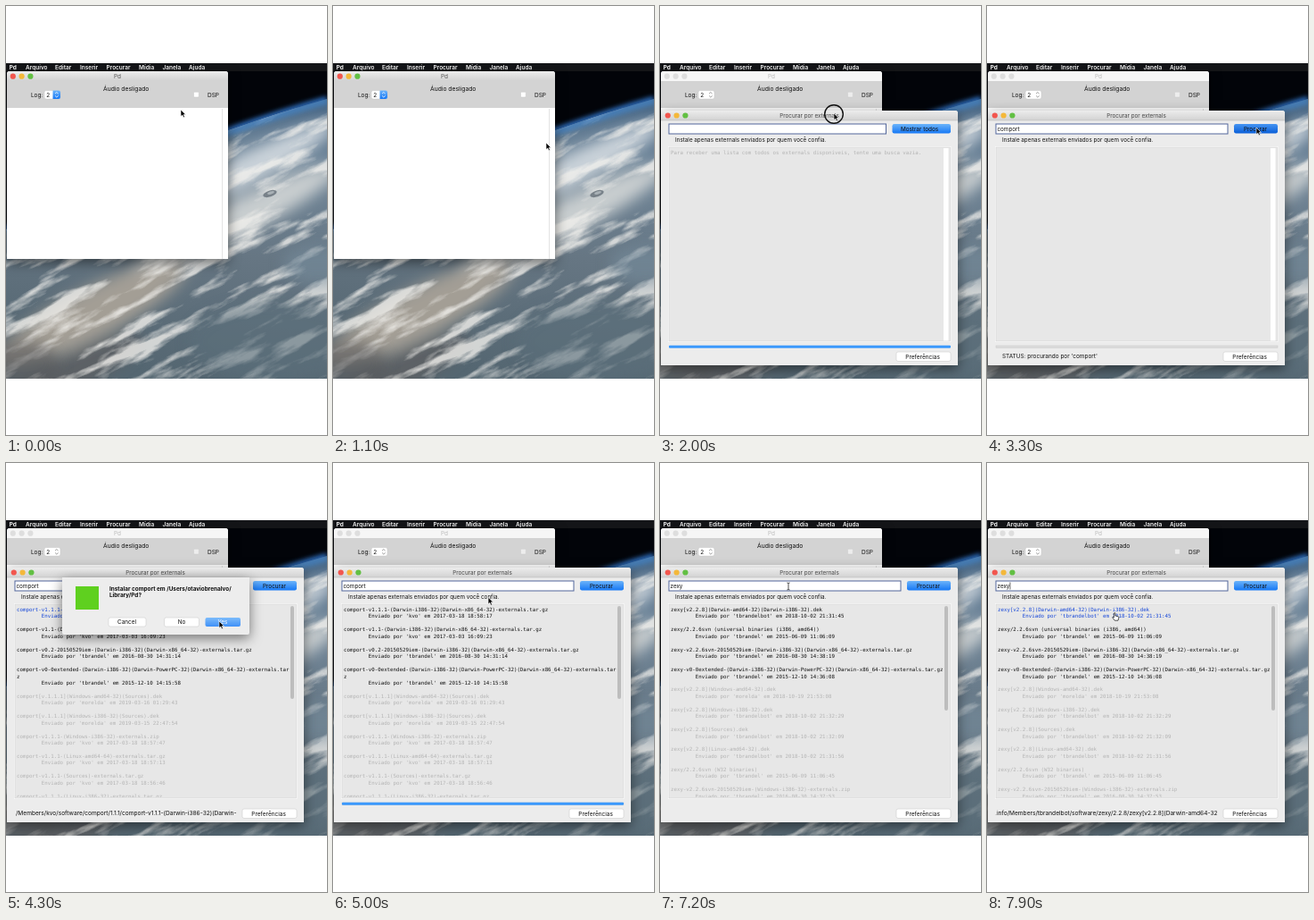
An HTML page for the animation above (8000 ms loop, 360x480 px).

```html
<!DOCTYPE html>
<html lang="pt">
<head>
<meta charset="utf-8">
<title>Procurar por externals</title>
<style>
  html, body { margin: 0; width: 100%; height: 100%; overflow: hidden; background: #fff; }
  svg { position: absolute; left: 0; top: 0; width: 360px; height: 480px; }
  #wall { will-change: transform; }
  text { font: 6.4px Inter, Roboto, sans-serif; fill: #111; }
  .mid { text-anchor: middle; }
  .menu text { font-size: 6.5px; font-weight: 600; fill: #fff; }
  .mono text { font: 5.77px "DejaVu Sans Mono", monospace; }
  .mono .dim { fill: #b4b4b4; }
  .mono .hot { fill: #1546d8; }
  text.strong { font-weight: 700; }
  .shadow { filter: drop-shadow(0 4px 7px rgba(0,0,0,.5)); }
  .plain { fill: #fff; stroke: #c4c4c4; stroke-width: .5; }
</style>
</head>
<body>
<svg id="wall" viewBox="0 0 360 480">
  <defs>
    <clipPath id="desk"><rect y="64" width="360" height="353"/></clipPath>
    <clipPath id="globe"><path d="M0 250Q140 178 250 139Q310 118 360 104V417H0Z"/></clipPath>
    <linearGradient id="sea" x1=".75" y1="0" x2=".6" y2="1">
      <stop offset="0" stop-color="#35587c"/>
      <stop offset=".28" stop-color="#71879a"/>
      <stop offset=".6" stop-color="#667683"/>
      <stop offset="1" stop-color="#546671"/>
    </linearGradient>
    <filter id="soft" x="-50%" y="-50%" width="200%" height="200%"><feGaussianBlur stdDeviation="8"/></filter>
    <filter id="glow" x="-20%" y="-50%" width="140%" height="200%"><feGaussianBlur stdDeviation="2.5"/></filter>
    <filter id="cloud" x="0" y="0" width="100%" height="100%">
      <feTurbulence type="fractalNoise" baseFrequency=".013 .06" numOctaves="6" seed="8"/>
      <feColorMatrix values="0 0 0 0 .89  0 0 0 0 .88  0 0 0 0 .85  4.6 0 0 0 -2.15"/>
    </filter>
  </defs>
  <g clip-path="url(#desk)">
    <rect y="64" width="360" height="353" fill="#020409"/>
    <path d="M0 250Q140 178 250 139Q310 118 360 104" fill="none" stroke="#2a68b4" stroke-width="7" filter="url(#glow)"/>
    <g clip-path="url(#globe)">
      <rect y="64" width="360" height="353" fill="url(#sea)"/>
      <g transform="rotate(-27 180 290)" filter="url(#soft)">
        <ellipse cx="300" cy="235" rx="120" ry="17" fill="#c9d2d9"/>
        <ellipse cx="270" cy="280" rx="130" ry="20" fill="#c8cdcf"/>
        <ellipse cx="80" cy="300" rx="120" ry="28" fill="#a39e95"/>
        <ellipse cx="20" cy="350" rx="100" ry="20" fill="#5c6165"/>
      </g>
      <rect x="-100" y="-10" width="620" height="600" transform="rotate(-27 180 290)" filter="url(#cloud)" opacity=".8"/>
      <g filter="url(#soft)" opacity=".6">
        <ellipse cx="300" cy="375" rx="95" ry="45" fill="#5b6f7b"/>
        <ellipse cx="15" cy="400" rx="45" ry="25" fill="#565658"/>
        <ellipse cx="350" cy="290" rx="40" ry="22" fill="#768c9c"/>
      </g>
      <path d="M0 250Q140 178 250 139Q310 118 360 104" fill="none" stroke="#4580bd" stroke-width="12" opacity=".8" filter="url(#glow)"/>
      <ellipse cx="296" cy="210" rx="8" ry="3.5" fill="#667079" opacity=".8" transform="rotate(-18 296 210)"/>
      <ellipse cx="297" cy="209" rx="4" ry="1.5" fill="#a9b1b6" transform="rotate(-18 297 209)"/>
    </g>
  </g>
</svg>

<svg id="ui" viewBox="0 0 360 480">
  <defs>
    <linearGradient id="bar" x2="0" y2="1"><stop stop-color="#ececec"/><stop offset="1" stop-color="#d2d2d2"/></linearGradient>
    <linearGradient id="blue" x2="0" y2="1"><stop stop-color="#6bb3fa"/><stop offset="1" stop-color="#1678f5"/></linearGradient>
    <linearGradient id="press" x2="0" y2="1"><stop stop-color="#4594f2"/><stop offset="1" stop-color="#0a5fd8"/></linearGradient>
    <linearGradient id="pale" x2="0" y2="1"><stop stop-color="#7dbcfb"/><stop offset="1" stop-color="#3f90f7"/></linearGradient>
    <clipPath id="listClip"><rect x="10" y="159" width="308" height="215"/></clipPath>
    <clipPath id="urlClip"><rect x="9.5" y="385" width="249.5" height="14"/></clipPath>
  </defs>
  <g clip-path="url(#desk)">
    <g class="menu" id="menu"><rect y="64" width="360" height="9" fill="#141518"/></g>

    <g class="shadow">
      <path d="M1 283V76Q1 73 4 73H246Q249 73 249 76V283Z" fill="#fff"/>
      <path id="pdBar" d="M1 84V76Q1 73 4 73H246Q249 73 249 76V84Z"/>
      <rect x="1" y="84" width="248" height="30" fill="#d3d3d3"/>
      <path d="M242.5 115V283" stroke="#e3e3e3"/>
    </g>
    <g id="pdLights" transform="translate(0 78.7)"></g>
    <text id="pdTitle" class="mid" x="125" y="81">Pd</text>
    <text class="mid" x="134.7" y="95" style="font-size:6.75px">Áudio desligado</text>
    <text x="28" y="101.5">Log:</text>
    <rect class="plain" x="43" y="94.5" width="18" height="9.6" rx="2"/>
    <path id="step" d="M52.5 94.5H59Q61 94.5 61 96.5V102Q61 104 59 104H52.5Z" fill="url(#blue)"/>
    <path id="arrows" d="M55 98.2L56.8 96.5L58.6 98.2M55 100.4L56.8 102.1L58.6 100.4" fill="none" stroke-width=".8"/>
    <text x="45.3" y="101.6">2</text>
    <rect id="check" class="plain" x="210.5" y="96.2" width="5.8" height="5.8" rx="1"/>
    <text x="226" y="101.5" style="font-size:6.5px">DSP</text>

    <g id="finder">
      <g class="shadow">
        <path d="M1 402V120Q1 117 4 117H331Q334 117 334 120V402Z" fill="#ececec"/>
        <path d="M1 128V120Q1 117 4 117H331Q334 117 334 120V128Z" fill="url(#bar)"/>
        <path d="M1 128H334" stroke="#bdbdbd" stroke-width=".6"/>
      </g>
      <g id="lights" transform="translate(1 122.5)"></g>
      <text class="mid" x="167.5" y="124.8" style="font-size:6.3px;fill:#444">Procurar por externals</text>
      <rect id="blank" x="1" y="128.3" width="333" height="273.7" fill="#fff"/>
      <g id="body">
        <rect id="field" x="10" y="132" height="11" fill="#fff" stroke="#52679b"/>
        <text id="query" x="11.5" y="139.8" style="font-size:6.3px"></text>
        <path id="caret" d="M0 133.5V141.5" stroke="#222" stroke-width=".7"/>
        <rect id="go" y="132" height="10.5" rx="2.2"/>
        <text id="goText" class="mid" y="139.6"></text>
        <text x="17" y="152" style="font-size:6.3px">Instale apenas externals enviados por quem você confia.</text>
        <rect x="9.5" y="157.5" width="316.5" height="218" fill="#e7e7e7" stroke="#fafafa"/>
        <rect x="10" y="158" width="315.5" height="217" fill="none" stroke="#cfcfcf" stroke-width=".5"/>
        <rect id="track" x="318" y="159" width="5.5" height="215.5" fill="#fff"/>
        <rect id="thumb" x="319" y="160" width="4" rx="2" fill="#bdbdbd"/>
        <g class="mono" clip-path="url(#listClip)">
          <text id="hint" class="dim" x="12" y="166">Para receber uma lista com todos os externals disponíveis, tente uma busca vazia.</text>
          <g id="listA"></g>
          <g id="listB"></g>
        </g>
        <rect id="trough" x="10" y="380" width="316" height="2.5" fill="#dcdcdc" stroke="#c2c2c2" stroke-width=".4"/>
        <rect id="progress" x="10" y="379.8" height="3" rx="1" fill="#3b99fc"/>
        <text id="status" x="17" y="394.3" style="font-size:6.45px"></text>
        <g clip-path="url(#urlClip)"><text id="url" x="258.5" y="394.3" text-anchor="end" style="font-size:6.6px"></text></g>
        <rect class="plain" x="265" y="387" width="61" height="10.5" rx="2"/>
        <text class="mid" x="294.6" y="394.5" style="font-size:6.5px">Preferências</text>
      </g>
    </g>

    <g id="dialog">
      <path class="shadow" d="M63 128H273V190Q273 192 271 192H65Q63 192 63 190Z" fill="#ededed"/>
      <rect x="78" y="138" width="26" height="26" fill="#5fd01f"/>
      <text class="strong" x="116" y="142.6">Instalar comport em /Users/otaviobrenalvo/</text>
      <text class="strong" x="116" y="150.2">Library/Pd?</text>
      <rect class="plain" x="115" y="173" width="42" height="10" rx="2"/>
      <rect class="plain" x="177.5" y="173" width="39" height="10" rx="2"/>
      <rect x="223.5" y="173" width="39.5" height="10" rx="2" fill="url(#pale)"/>
      <text class="mid" x="135.5" y="180.3">Cancel</text>
      <text class="mid" x="197" y="180.3">No</text>
      <text class="mid" x="243" y="180.3" style="fill:#fff">Yes</text>
    </g>

    <circle id="ring" r="10.3" fill="none" stroke="#111" stroke-width="1.4"/>
    <g id="mouse">
      <path id="arrow" d="M0 0V7.6L1.8 6L3 8.8L4.4 8.2L3.2 5.5H5.5Z" fill="#000" stroke="#fff" stroke-width=".6"/>
      <path id="beam" d="M-1.6 -4Q0 -4 0 -3V3Q0 4 -1.6 4M1.6 -4Q0 -4 0 -3M1.6 4Q0 4 0 3" fill="none" stroke="#222" stroke-width=".8"/>
      <path id="hand" d="M-1.6 -4Q-.8 -5 0 -4V-1L3 -.3Q4 0 3.8 1.2L3 4.2H-.8L-3.4 .8Q-3.2 -.4 -1.6 .8Z" fill="#fff" stroke="#111" stroke-width=".7"/>
    </g>
  </g>
</svg>

<script>
const LOOP = 8000;
const $ = id => document.getElementById(id);
const set = (id, attrs) => { for (const k in attrs) $(id).setAttribute(k, attrs[k]); };
const show = (id, on) => { $(id).style.display = on ? "" : "none"; };
const put = (id, s) => { if ($(id).textContent !== s) $(id).textContent = s; };
const within = (t, a, b) => t >= a && t < b;

function add(parent, tag, attrs, s = "") {
  const el = document.createElementNS("http://www.w3.org/2000/svg", tag);
  for (const k in attrs) el.setAttribute(k, attrs[k]);
  el.textContent = s;
  $(parent).appendChild(el);
}

// Eased values along [time, ...values] stops.
function along(stops, t) {
  let i = 0;
  while (i < stops.length - 1 && stops[i + 1][0] <= t) i++;
  const a = stops[i], b = stops[i + 1] || a;
  const u = b === a ? 0 : Math.max(0, (t - a[0]) / (b[0] - a[0]));
  const e = u * u * (3 - 2 * u);
  return a.slice(1).map((v, k) => v + (b[k + 1] - v) * e);
}

[["Pd", 3.7], ["Arquivo", 22], ["Editar", 55], ["Inserir", 83], ["Procurar", 112.5],
 ["Mídia", 149], ["Janela", 175.5], ["Ajuda", 205]].forEach(([s, x], i) =>
  add("menu", "text", { x, y: 70.6, class: i ? "" : "strong" }, s));

const COLORS = ["#f2564e", "#f4b83a", "#62c043"];
for (const id of ["pdLights", "lights"])
  COLORS.forEach((fill, i) => add(id, "circle", { cx: 7.8 + i * 9.8, r: 3.1, fill }));

const MAC = "(Darwin-i386-32)(Darwin-x86_64-32)-externals.tar.gz";
const FAT = "(Darwin-i386-32)(Darwin-PowerPC-32)(Darwin-x86_64-32)-externals.tar";
const comport = [
  ["comport-v1.1.1-" + MAC, "kvo", "2017-03-18 18:58:17"],
  ["comport-v1.1-" + MAC, "kvo", "2017-03-03 16:09:23"],
  ["comport-v0.2-20150529iem-" + MAC, "tbrandel", "2016-08-30 14:31:14"],
  ["comport-v0-0extended-" + FAT + "\nz", "tbrandel", "2015-12-10 14:15:58"],
  ["comport[v.1.1.1](Windows-amd64-32)(Sources).dek", "morelda", "2019-03-16 01:29:43"],
  ["comport[v.1.1.1](Windows-i386-32)(Sources).dek", "morelda", "2019-03-15 22:47:54"],
  ["comport-v1.1.1-(Windows-i386-32)-externals.zip", "kvo", "2017-03-18 18:57:47"],
  ["comport-v1.1.1-(Linux-amd64-64)-externals.tar.gz", "kvo", "2017-03-18 18:57:13"],
  ["comport-v1.1.1-(Sources)-externals.tar.gz", "kvo", "2017-03-18 18:56:46"],
  ["comport-v1.1.1-(Linux-i386-32)-externals.tar.gz", "kvo", "2017-03-18 18:56:20"]
];
const zexy = [
  ["zexy[v2.2.8](Darwin-amd64-32)(Darwin-i386-32).dek", "tbrandelbot", "2018-10-02 21:31:45"],
  ["zexy/2.2.6svn (universal binaries (i386, amd64))", "tbrandel", "2015-06-09 11:06:09"],
  ["zexy-v2.2.6svn-20150529iem-" + MAC, "tbrandel", "2016-08-30 14:38:19"],
  ["zexy-v0-0extended-" + FAT + ".gz", "tbrandel", "2015-12-10 14:36:08"],
  ["zexy[v2.2.8](Windows-amd64-32).dek", "morelda", "2018-10-19 21:53:08"],
  ["zexy[v2.2.8](Windows-i386-32).dek", "tbrandelbot", "2018-10-02 21:32:29"],
  ["zexy[v2.2.8](Sources).dek", "tbrandelbot", "2018-10-02 21:32:09"],
  ["zexy[v2.2.8](Linux-amd64-32).dek", "tbrandelbot", "2018-10-02 21:31:56"],
  ["zexy/2.2.6svn (W32 binaries)", "tbrandel", "2015-06-09 11:06:45"],
  ["zexy-v2.2.6svn-20150529iem-(Windows-i386-32)-externals.zip", "tbrandel", "2016-08-30 14:37:53"]
];

function fill(id, items) {
  let y = 166;
  const line = (x, s, cls) => { add(id, "text", { x, y: y.toFixed(2), class: cls }, s); y += 7.45; };
  items.forEach(([name, user, date], i) => {
    const cls = i > 3 ? "dim" : "";
    name.split("\n").forEach(s => line(12, s, cls));
    line(39.8, `Enviado por '${user}' em ${date}`, cls);
    y += 7.45;
  });
}
fill("listA", comport);
fill("listB", zexy);

const URL_A = "/Members/kvo/software/comport/1.1.1/comport-v1.1.1-(Darwin-i386-32)(Darwin-";
const URL_B = "ta.info/Members/tbrandelbot/software/zexy/2.2.8/zexy[v2.2.8](Darwin-amd64-32";

// Up to the Ajuda menu, down to its entry, then the window is dragged by its title.
const POINTER = [
  [0, 196, 116], [500, 214, 68], [700, 214, 68], [1100, 239, 153], [1450, 239, 153],
  [1600, 235, 148], [1900, 195, 120], [2600, 195, 120], [3100, 302, 136], [3450, 302, 136],
  [3800, 190, 166], [3950, 190, 166], [4250, 239, 177], [4500, 239, 177],
  [5300, 144, 138], [7200, 144, 138], [7600, 144, 172]
];
const DRAG = [[1600, 40, 28], [1900, 0, 0]];
const PRESSES = [[1600, 2100], [3100, 3200], [3900, 4000], [4400, 4500], [5300, 5400]];

const typed = (s, from, t) => s.slice(0, Math.max(0, Math.floor((t - from) / 100)));

function draw(t) {
  const [x, y] = along(POINTER, t);
  const open = t >= 1300, ready = t >= 1600;
  const searching = within(t, 3200, 3600) || within(t, 6500, 7000);
  const listA = within(t, 3600, 6500), listB = t >= 7000;
  const hotA = within(t, 3700, 4500), hotB = listB && y > 160;
  const text = t < 5500 ? typed("comport", 2200, t) : typed("zexy", 5800, t);

  $("pdBar").setAttribute("fill", open ? "#f6f6f6" : "url(#bar)");
  $("pdTitle").style.fill = open ? "#bbb" : "#555";
  [...$("pdLights").children].forEach((c, i) => c.setAttribute("fill", open ? "#dedede" : COLORS[i]));
  show("step", !ready);
  set("arrows", { stroke: ready ? "#888" : "#fff" });
  set("check", { opacity: ready ? .6 : 1 });

  show("finder", open);
  set("finder", { transform: `translate(${along(DRAG, t)})` });
  show("blank", !ready);
  show("body", ready);

  const narrow = t >= 2300;
  const goX = narrow ? 277 : 260.5;
  set("field", { width: narrow ? 260 : 243.5 });
  set("go", { x: goX, width: 326 - goX, fill: within(t, 3100, 3400) ? "url(#press)" : "url(#blue)" });
  set("goText", { x: narrow ? 301 : 291 });
  put("goText", narrow ? "Procurar" : "Mostrar todos");
  put("query", text);
  show("caret", ready && t % 1000 >= 500);
  if (ready) set("caret", { transform: `translate(${12 + (text ? $("query").getComputedTextLength() : 0)})` });

  show("hint", t < 3200);
  show("listA", listA);
  show("listB", listB);
  show("thumb", listA || listB);
  show("track", !listA && !listB);
  set("thumb", { height: listB ? 117 : 104 });
  for (const [id, hot] of [["listA", hotA], ["listB", hotB]])
    for (const el of [...$(id).children].slice(0, 2)) el.setAttribute("class", hot ? "hot" : "");

  const loading = within(t, 4500, 6500);
  show("trough", searching || loading);
  show("progress", t < 3200 || loading);
  set("progress", { width: loading ? 316 * Math.min(1, (t - 4500) / 400) : 316 });
  put("status", searching ? `STATUS: procurando por '${text}'` : "");
  put("url", hotA ? URL_A : hotB ? URL_B : "");

  const dialog = within(t, 4000, 4500);
  show("dialog", dialog);
  show("ring", PRESSES.some(([a, b]) => within(t, a, b)));
  set("ring", { cx: x, cy: y + 1 });
  set("mouse", { transform: `translate(${x} ${y})` });
  const beam = t > 4500 && y < 144, hand = !dialog && (hotA || hotB);
  show("beam", beam);
  show("hand", hand);
  show("arrow", !beam && !hand);
}

const start = performance.now();
function tick() {
  draw(Math.floor((performance.now() - start) % LOOP / 100) * 100);
  requestAnimationFrame(tick);
}
tick();
</script>
</body>
</html>
```
